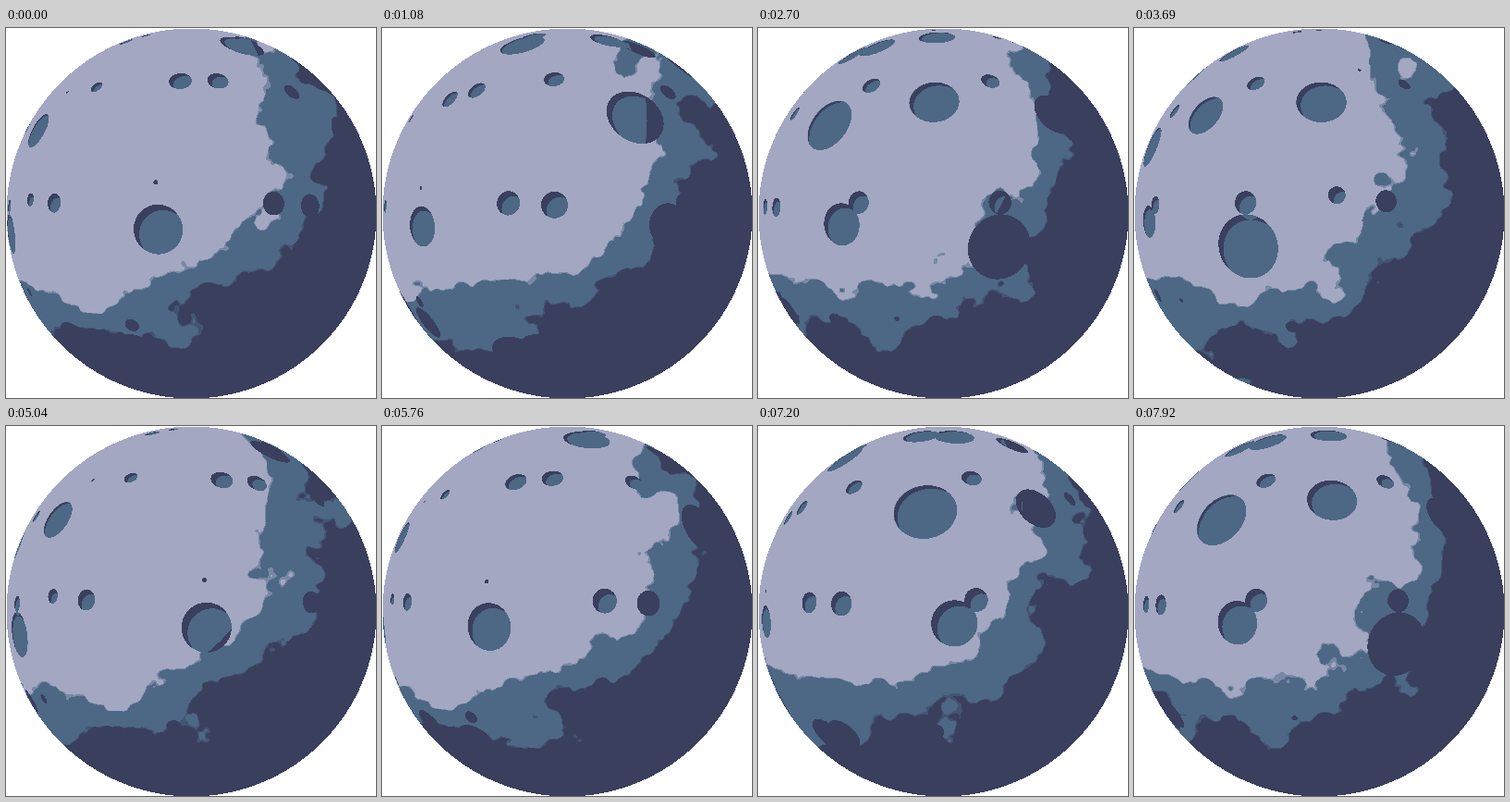
Write an HTML page with a canvas that moves like this. It is 400 px wide and 400 px high and loops after 8000 ms.

```html
<!DOCTYPE html>
<html lang="en">
<head>
<meta charset="utf-8">
<title>Turning moon</title>
<style>
  html, body { margin: 0; width: 100%; height: 100%; overflow: hidden; background: #fff; }
  canvas { display: block; width: 100%; height: 100%; }
</style>
</head>
<body>
<canvas id="stage" width="400" height="400"></canvas>
<script>
const SIZE = 400;
const LOOP_MS = 8000, STEP_MS = 90, STEPS_PER_TURN = 60;
const LIGHT = 0.25;                    // light origin, same in x and y
const GROUND_CELLS = 8, CRATER_CELLS = 5;
const SEED = 7.06;
const HALF_LIT = 0.615, UNLIT = 0.729, CRATER_UNLIT = 0.465, SOFT_EDGE = 0.005;

const context = document.getElementById('stage').getContext('2d');
const image = context.createImageData(SIZE, SIZE);
const pixels = new Uint32Array(image.data.buffer);

const pack = ([r, g, b]) => (255 << 24 | b << 16 | g << 8 | r) >>> 0;
const blend = (p, q) => p.map((v, i) => Math.round((v + q[i]) / 2));
const pale = [163, 167, 194], teal = [76, 104, 133], navy = [58, 63, 94];
const PALE = pack(pale), TEAL = pack(teal), NAVY = pack(navy);
const PALE_TEAL = pack(blend(pale, teal)), TEAL_NAVY = pack(blend(teal, navy));

const fract = v => v - Math.floor(v);

// Seeded random value for each lattice point
const lattice = Float64Array.from({ length: 64 }, (_, i) =>
  fract(Math.sin((i & 7) * 12.9898 + (i >> 3) * 78.233) * 15.5453 * SEED));

function noise(x, y) {
  const ix = Math.floor(x), iy = Math.floor(y);
  const fx = x - ix, fy = y - iy;
  const sx = fx * fx * (3 - 2 * fx), sy = fy * fy * (3 - 2 * fy);
  const x0 = ix & 7, x1 = (ix + 1) & 7;
  const y0 = (iy & 7) << 3, y1 = ((iy + 1) & 7) << 3;
  const top = lattice[y0 + x0] + (lattice[y0 + x1] - lattice[y0 + x0]) * sx;
  const bottom = lattice[y1 + x0] + (lattice[y1 + x1] - lattice[y1 + x0]) * sx;
  return top + (bottom - top) * sy;
}

function fractalNoise(x, y) {
  let value = 0, scale = 0.5;
  for (let octave = 0; octave < 4; octave++) {
    value += noise(x, y) * scale;
    x *= 2;
    y *= 2;
    scale *= 0.5;
  }
  return value;
}

// One disc per cell: 0 inside, 1 outside, with a narrow smooth rim
function discField(x, y) {
  const row = Math.floor(y);
  x += row * 0.31;
  const column = Math.floor(x);
  const h = lattice[(row % CRATER_CELLS) * 8 + column % CRATER_CELLS];
  const centre = 0.25 + h * 0.5, radius = h * 0.25;
  const dx = x - column - centre, dy = y - row - centre;
  const distance = Math.sqrt(dx * dx + dy * dy);
  if (distance >= radius) return 1;
  if (distance <= radius * 0.9) return 0;
  const k = (distance - radius * 0.9) / (radius * 0.1);
  return k * k * (3 - 2 * k);
}

const craterDepth = (x, y) => 1 - discField(x + 11, y + 11) * discField(x + 12, y + 12);

// Everything about a point that does not depend on time
const points = [];
for (let py = 0; py < SIZE; py++) {
  for (let px = 0; px < SIZE; px++) {
    const u = px / SIZE, v = py / SIZE;
    if (Math.hypot(u - 0.5, v - 0.5) > 0.49999) continue;
    const cx = u * 2 - 1, cy = v * 2 - 1;
    const bulge = 1 + Math.sqrt(Math.max(0, 1 - cx * cx - cy * cy));
    const warp = fractalNoise(u, v);
    points.push({
      index: py * SIZE + px,
      light: Math.hypot(u - LIGHT, v - LIGHT),
      groundX: u * GROUND_CELLS + warp,
      groundY: v * GROUND_CELLS + warp,
      craterX: (cx / bulge * 0.5 + 0.5) * CRATER_CELLS,
      craterY: (cy / bulge * 0.5 + 0.5) * CRATER_CELLS
    });
  }
}

function groundColor(point, turn) {
  const shade = point.light +
    0.3 * fractalNoise(point.groundX + turn * GROUND_CELLS, point.groundY);
  if (shade > UNLIT + SOFT_EDGE) return NAVY;
  if (shade > UNLIT) return TEAL_NAVY;
  if (shade > HALF_LIT + SOFT_EDGE) return TEAL;
  return shade > HALF_LIT ? PALE_TEAL : PALE;
}

function pointColor(point, turn) {
  const x = point.craterX + turn * CRATER_CELLS, y = point.craterY;
  const depth = craterDepth(x, y);
  if (depth < 0.5) return groundColor(point, turn);
  if (point.light > CRATER_UNLIT) return NAVY;
  const shift = (LIGHT - 0.5) * 0.03 * CRATER_CELLS;
  const towardsLight = craterDepth(x + shift, y + shift);
  return towardsLight < depth - (0.5 - point.light) * 2 ? NAVY : TEAL;
}

function draw(step) {
  const turn = step / STEPS_PER_TURN;
  for (const point of points) pixels[point.index] = pointColor(point, turn);
  context.putImageData(image, 0, 0);
}

const start = performance.now();
let shownStep = -1;

function tick() {
  const step = Math.floor((performance.now() - start) % LOOP_MS / STEP_MS);
  if (step !== shownStep) draw(shownStep = step);
  requestAnimationFrame(tick);
}
tick();
</script>
</body>
</html>
```
